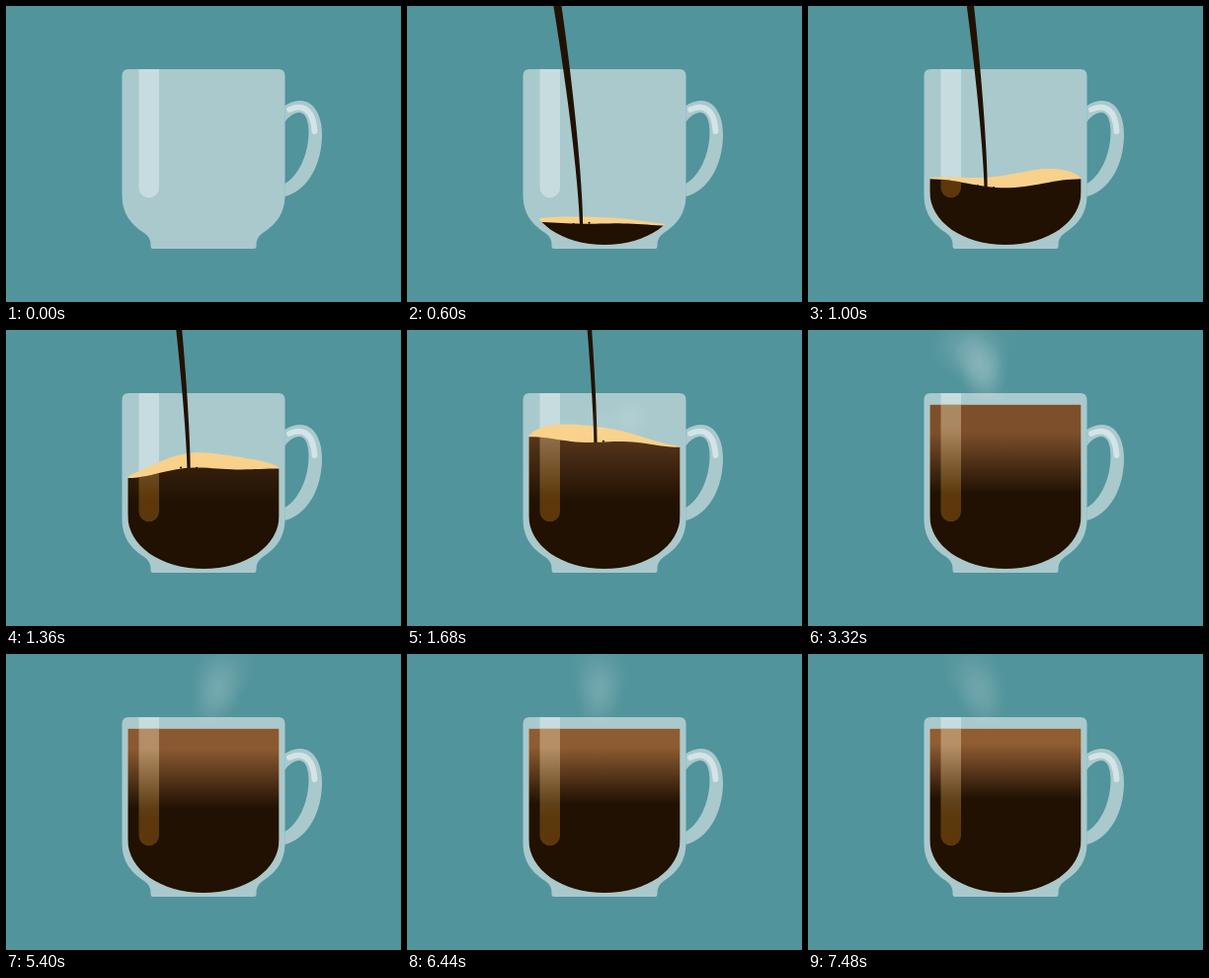
An HTML page with a canvas that plays this animation: 400x300 px, repeating every 7.52 s.

```html
<!DOCTYPE html>
<html lang="en">
<head>
<meta charset="utf-8">
<title>Coffee</title>
<style>
html, body { margin: 0; width: 100%; height: 100%; overflow: hidden; background: #52949b; }
canvas { display: block; width: 400px; height: 300px; }
</style>
</head>
<body>
<canvas id="stage" width="400" height="300"></canvas>
<script>
const LOOP = 7520, STEP = 40;
const POUR_START = 120, POUR_END = 2400;
const FILL_START = 300, FILL_END = 2560;
const BOTTOM = 243, FULL = 75.7;
const LEFT = 123.3, RIGHT = 276.6;
const DARK = [33, 17, 3], BROWN = [160, 104, 58];
const { PI, sin, cos, min, max, exp } = Math;

const ctx = document.getElementById('stage').getContext('2d');

const cup = new Path2D('M124 64H276Q282.5 64 282.5 71V191C282.5 212 272 222 260 230Q253.5 235 253.5 241V244Q253.5 246 251 246H149Q146.5 246 146.5 244V241Q146.5 235 140 230C128 222 117.5 212 117.5 191V71Q117.5 64 124 64Z');
const handle = new Path2D('M282.5 101Q290 96 298 96C312 96 320 111 320 130C320 160 306 187 282.5 193V180C295 173 306.5 152 306.5 128C306.5 115 303 107.5 296 108Q288 109 282.5 117.5Z');
const glint = new Path2D('M287 105C297 100 311 101 312.5 127');
const bowl = new Path2D(`M${LEFT} 0H${RIGHT}V188C${RIGHT} 219 243 242 200 242S${LEFT} 219 ${LEFT} 188Z`);
const strip = new Path2D('M134.5 64H155V184A10.25 10.25 0 0 1 134.5 184Z');

const lerp = (a, b, u) => a + (b - a) * u;
const clamp = u => max(0, min(1, u));
const progress = (t, from, to) => clamp((t - from) / (to - from));

const filled = t => progress(t, FILL_START, FILL_END);
const level = t => lerp(BOTTOM, FULL, sin(filled(t) * PI / 2) ** 1.28);
const stir = t => sin(filled(t) * PI);

// Coffee surface: standing waves that die away as the cup fills
function coffeeY(t, u) {
  const a = (t - 1000) * .01155;
  const bowed = 5.4 * cos(a) * cos(2 * PI * u);
  const tilted = sin(a) * (3.7 * cos(PI * u) + 2 * cos(3 * PI * u));
  return level(t) - stir(t) * (bowed + tilted);
}

// Foam lies on the coffee, its crest swinging from side to side
function foamY(t, u) {
  const swing = .7 * cos((t - 1060) / 1200 * 2 * PI);
  const crest = max(0, sin(PI * u)) ** .7 * (1 - swing * cos(PI * u));
  return coffeeY(t, u) - stir(t) * (1 + 14.5 * crest);
}

function surface(height, t) {
  const p = new Path2D(), n = 32;
  for (let i = 0; i <= n; i++) p.lineTo(lerp(LEFT, RIGHT, i / n), height(t, i / n));
  p.lineTo(RIGHT, 245);
  p.lineTo(LEFT, 245);
  p.closePath();
  return p;
}

function fill(path, color) {
  ctx.fillStyle = color;
  ctx.fill(path);
}

function drawGlass() {
  fill(cup, 'rgba(255,255,255,.5)');
  fill(handle, 'rgba(255,255,255,.5)');
  fill(strip, 'rgba(255,255,255,.35)');
  ctx.strokeStyle = 'rgba(255,255,255,.5)';
  ctx.lineWidth = 5.8;
  ctx.lineCap = 'round';
  ctx.stroke(glint);
}

function drawFoam(t) {
  ctx.save();
  ctx.clip(bowl);
  fill(surface(foamY, t), '#f8d18b');
  ctx.restore();
}

function drawPour(t) {
  const q = progress(t, POUR_START, POUR_END);
  const topX = lerp(138, 206.5, q), footX = 175 + 34 * q * q;
  const topW = 8.5 * (1 - q * q), footW = min(topW, 3.2);
  const surfaceAt = x => coffeeY(t, (x - LEFT) / (RIGHT - LEFT));
  const foot = min(242, surfaceAt(footX) + 1);
  const tail = progress(t, 2280, POUR_END), tip = progress(t, 80, FILL_START);
  const n = 16;

  ctx.fillStyle = '#211103';
  ctx.beginPath();
  for (const side of [-1, 1]) {
    for (let i = 0; i <= n; i++) {
      const u = lerp(tail, tip, side < 0 ? i / n : 1 - i / n);
      const x = lerp(topX, footX, 1 - (1 - u) ** 1.4);
      ctx.lineTo(x + side * lerp(topW, footW, u) / 2, foot * u);
    }
  }
  ctx.fill();

  if (tip < 1) return;
  for (const side of [-1, 1]) {
    const x = footX + side * 8;
    ctx.beginPath();
    ctx.arc(x, surfaceAt(x) - sin(t / 90 + side), 1.1, 0, 2 * PI);
    ctx.fill();
  }
}

// Puffs rise from the surface in a slowly swaying column
function drawSteam(t) {
  const life = 1400, gap = 140;
  const sway = -cos((t - 3320) / 4160 * 2 * PI);
  for (let i = 0, born = 1300; born < t; i++, born += gap) {
    const age = t - born;
    if (age > life) continue;
    const jitter = ((i * .618 + .8) % 1) * 2 - 1;
    const y = level(t) - 5 - age * .05;
    const x = 194 + sway * (9 + .35 * max(0, 70 - y)) + jitter * (5 + 36 * stir(born));
    const r = 18 + age * .012;
    const a = (.05 + .09 * exp((2000 - max(born, 2000)) / 1200)) * sin(PI * age / life);
    const g = ctx.createRadialGradient(x, y, 0, x, y, r);
    g.addColorStop(0, `rgba(255,255,255,${a})`);
    g.addColorStop(.5, `rgba(255,255,255,${a * .6})`);
    g.addColorStop(1, 'rgba(255,255,255,0)');
    ctx.fillStyle = g;
    ctx.fillRect(x - r, y - r, 2 * r, 2 * r);
  }
}

function drawCoffee(t) {
  const age = max(0, t - 1000);
  const top = DARK.map((c, i) => lerp(c, BROWN[i], age / (age + 900)));
  const shade = ctx.createLinearGradient(0, 110 - age * .003, 0, 176 - age * .0045);
  shade.addColorStop(0, `rgb(${top})`);
  shade.addColorStop(1, `rgb(${DARK})`);
  const shine = ctx.createLinearGradient(0, 95, 0, 168);
  shine.addColorStop(0, 'rgba(255,240,200,.35)');
  shine.addColorStop(1, 'rgba(201,128,26,.35)');

  const body = surface(coffeeY, t);
  ctx.save();
  ctx.clip(bowl);
  fill(body, shade);
  ctx.clip(body);
  fill(strip, shine);
  ctx.restore();
}

const start = performance.now();

function draw() {
  const now = max(0, performance.now() - start) % LOOP;
  const t = Math.floor(now / STEP) * STEP;
  ctx.fillStyle = '#52949b';
  ctx.fillRect(0, 0, 400, 300);
  drawGlass();
  if (t > FILL_START) drawFoam(t);
  if (t >= POUR_START && t < POUR_END) drawPour(t);
  drawSteam(t);
  if (t > FILL_START) drawCoffee(t);
  requestAnimationFrame(draw);
}
draw();
</script>
</body>
</html>
```
